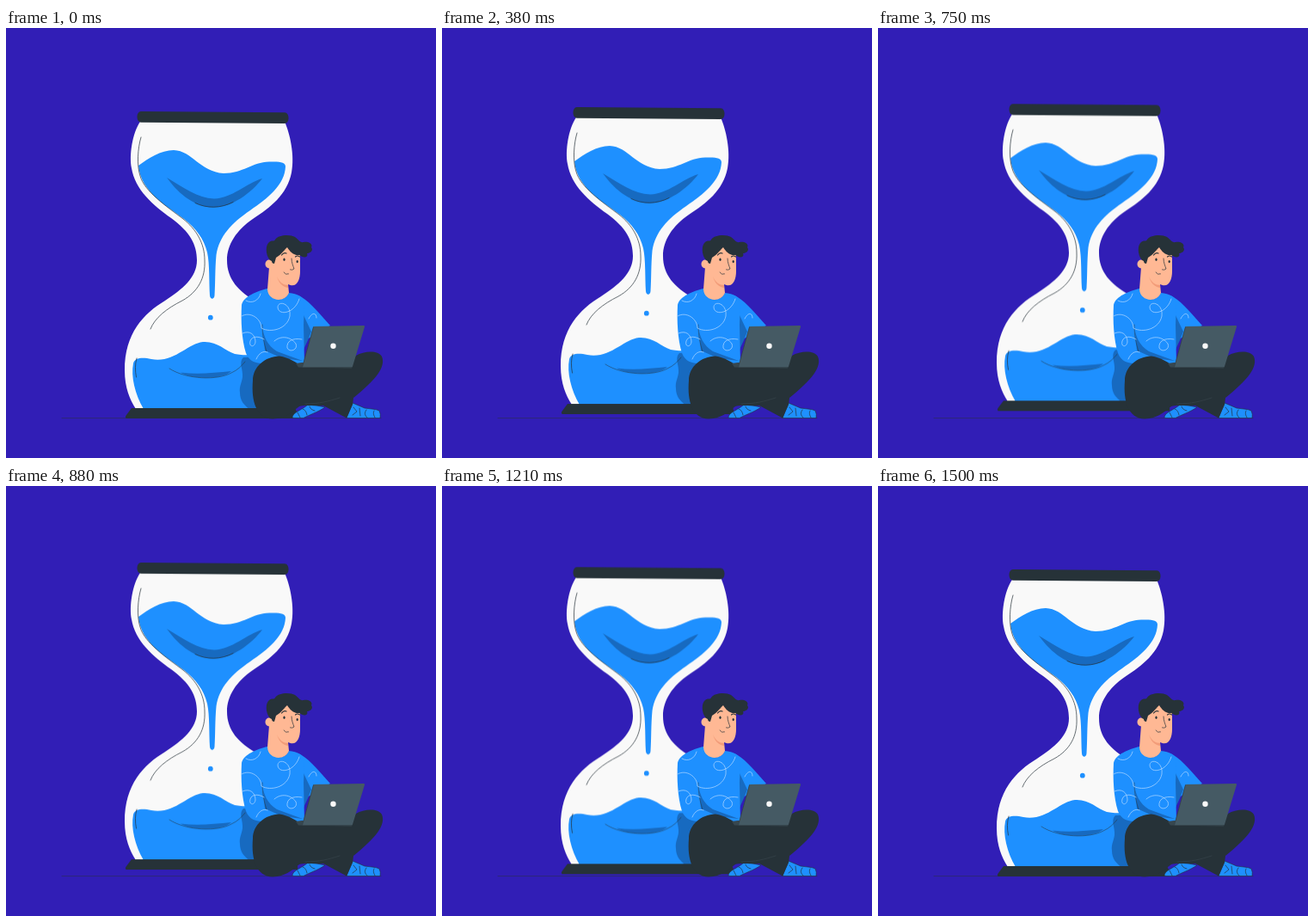
An HTML page that plays this animation: 500 by 500 pixels, repeating every 1540 ms.

```html
<!DOCTYPE html>
<html lang="en">
<head>
<meta charset="utf-8">
<title>Hourglass</title>
<style>
  html, body { margin: 0; width: 100%; height: 100%; overflow: hidden; background: #311eb6; }
  svg { display: block; width: 100vw; height: 100vh; }
  .ink { fill: #263238; }
  .blue { fill: #1e90ff; }
  .shade { fill: #176ac0; }
  .skin { fill: #ffb894; }
  .white { fill: #f9f9f9; }
  .line { fill: none; stroke: #263238; stroke-width: .7; stroke-linecap: round; stroke-linejoin: round; }
  .swirl { fill: none; stroke: #a5d2ff; stroke-width: .8; stroke-linecap: round; }
  #glass { animation: float 1540ms cubic-bezier(.37, 0, .63, 1) -40ms infinite; }
  @keyframes float {
    0%, 100% { transform: translateY(0); }
    50% { transform: translateY(-8.7px); }
  }
</style>
</head>
<body>
<svg viewBox="0 0 500 500">
  <path class="line" d="M65 453.6H436" style="stroke-width:.5"/>

  <g id="glass">
    <path class="white" d="M156 109C147 122 143 148 146 163C150 188 171 206 192 221C214 237 222 252 222 270C222 290 205 304 185 317C160 332 138 355 138 398C138 418 144 432 151 443H326C336 430 340 415 340 398C340 355 318 334 292 319C270 306 257 292 257 270C257 252 268 235 287 222C307 209 327 194 332 168C336 148 330 122 324 109Z"/>
    <!-- upper liquid with drip -->
    <path class="blue" d="M154 160C165 152 180 142 195 142C217 143 225 167 253 169C276 169 286 156 306 155.500C319 155 325 156 325 161C324 183 304 198 284 212C262 227 248 242 244.500 264C243 280 243.500 297 242.500 311C242 316 237.500 316 237 311C236 296 237 275 234 261C230 245 221 233 207 222C187 207 157 191 154 160Z"/>
    <path class="shade" d="M187 174C206 185 223 198 242 198.500C263 198 280 180 298 175C285 192 263 208.500 241 208.500C216 208 198 189 187 174Z"/>
    <path class="line" d="M220 203.500C233 210 250 210 264 202.500"/>
    <circle class="blue" cx="237.800" cy="336.700" r="2.900"/>
    <!-- lower liquid -->
    <path class="blue" d="M148 390C150 383 159 383 169 385C195 390 211 367 229 365C246 364 254 375 266 379C275 381 285 380 330 381V443H160C150 426 145 405 148 390Z"/>
    <path class="shade" d="M276 383C270 389 276 397 275 406C274 413 271 417 272 424C272 433 277 439 283 443H310V382Z"/>
    <path class="shade" d="M203 400.500C222 403 242 401 262 399C252 409 217 409 203 400.500Z"/>
    <path class="line" d="M190 396C210 409 246 410 262 401C269 398 274 393 278 388" style="stroke-width:.5"/>
    <!-- glass contours -->
    <path class="line" d="M157 127C153 140 152 160 156 172C161 190 186 207 206 222C221 234 231 250 231 270C232 291 223 307 205 317C187 326 173 337 168 350"/>
    <path class="line" d="M152 384C150 391 150 398 151.500 406"/>
    <path class="ink" d="M157 97L324 98.300C330 98.500 330 111 324 111L157 109.700C151 109.500 151 97 157 97Z"/>
    <path class="ink" d="M146 442H336Q340 448 339 454H142Q137 454 140 450Z"/>
  </g>

  <g id="man">
    <!-- far arm and torso -->
    <path class="blue" d="M340 311C350 315 361 328 377 346L350 362L338 340Z"/>
    <path class="shade" d="M346 334L355 353L351 363L344 378Z"/>
    <path class="blue" d="M274 322C276 312 292 306 304 303C307 317 323 320 329 308C339 309 346 312 347 320L346 345L347 390H300C290 390 283 388 279 378C274 362 273 340 274 322Z"/>
    <path class="shade" d="M298 345C299 359 304 369 315 376L345 387L321 384L301 375Z"/>
    <path class="line" d="M298 345C298 358 300 367 303 376" style="stroke-width:.5"/>

    <g class="swirl">
      <path d="M279 317C286 321 294 317 296 309"/>
      <path d="M274 335C284 329 297 338 297 349C308 355 327 350 330 335C332 320 316 316 316 325C317 335 336 332 341 315"/>
      <path d="M275 355C284 351 290 357 290 365C289 372 282 371 284 364C286 358 294 358 300 362"/>
      <path d="M312 364C320 357 331 359 337 367C340 374 330 378 327 372C326 364 333 360 344 362"/>
      <path d="M352 338C356 330 361 331 361 337"/>
      <path d="M291 385C294 378 299 375 304 377"/>
    </g>

    <!-- head -->
    <path class="skin" d="M306 278L304 304C305 318 324 320 329 308L328 298C338 303 342 293 342 283L342 263L328 252L313 256Z"/>
    <ellipse class="skin" cx="306" cy="274.500" rx="4.500" ry="5"/>
    <path d="M315 289C318 296 323 299 328 299V302C321 301 317 296 315 289Z" fill="#f29c79"/>
    <path class="ink" d="M307 270C301 263 302 252 306 249C309 246 312 249 313 246C317 240 331 240 336 243C340 246 342 250 346 249C352 248 357 251 355 255C358 259 353 262 350 262C352 267 346 268 341 264C335 265 330 260 327 255C322 260 318 265 314 267L312 274Q309 274 309 271Z"/>
    <g class="ink">
      <ellipse cx="323.500" cy="269.300" rx="1.100" ry="1.700"/>
      <ellipse cx="338.700" cy="271.600" rx="1.100" ry="1.700"/>
    </g>
    <path class="line" d="M320.500 264Q323 260.500 326 262M336.500 266Q339 264 341.500 266" style="stroke-width:1.200"/>
    <path class="line" d="M332 268C332 273 334 277 335 280Q333 282 330.500 281M323 284Q325 287.500 328.500 286"/>

    <!-- socks and legs -->
    <g stroke="#263238" stroke-width=".6">
      <path class="blue" d="M333 452C335 446 345 444 352 437L371 441C362 447 352 450 346 453.500H335Q333 454 333 452Z"/>
      <path class="blue" d="M403 436L417 442C424 443 430 443 434 445Q436 449 435 453.500H396Z"/>
    </g>
    <path class="line" d="M339 447L342 453M345 443Q349 444 350 450M353 440Q354 444 359 445M404 441L408 446L403 450M411 442L412 451M419 444Q415 449 420 453M428 445Q426 448 429 453"/>
    <path class="ink" d="M287 410C287 394 301 382 318 381.500C329 383 337 389 346 394L397 393L407 381C416 376 432 374 437 382C442 394 430 409 404 430L403 438L396 453.500L369 439C358 440 347 438 341 440C332 447 325 454 310 454.500C291 454 285 434 287 410Z"/>
    <path class="line" d="M348 437C365 437 375 434 388 430" style="stroke:#3d4b52;stroke-width:.5"/>

    <!-- laptop -->
    <path d="M337 390L344 389L402 393V395.500L340 394.500Z" fill="#37474f"/>
    <path d="M358.500 347L416 346Q417.500 346 417 347.500L403 393.500Q402.500 395 401 395H345.500Q344 395 344.500 393.500L357 348.500Q357.500 347 358.500 347Z" fill="#455a64"/>
    <path class="line" d="M357.500 347.500L344.500 394.500H402" style="stroke-width:.5"/>
    <circle class="white" cx="380.500" cy="369.700" r="3.200"/>
  </g>
</svg>
</body>
</html>
```
